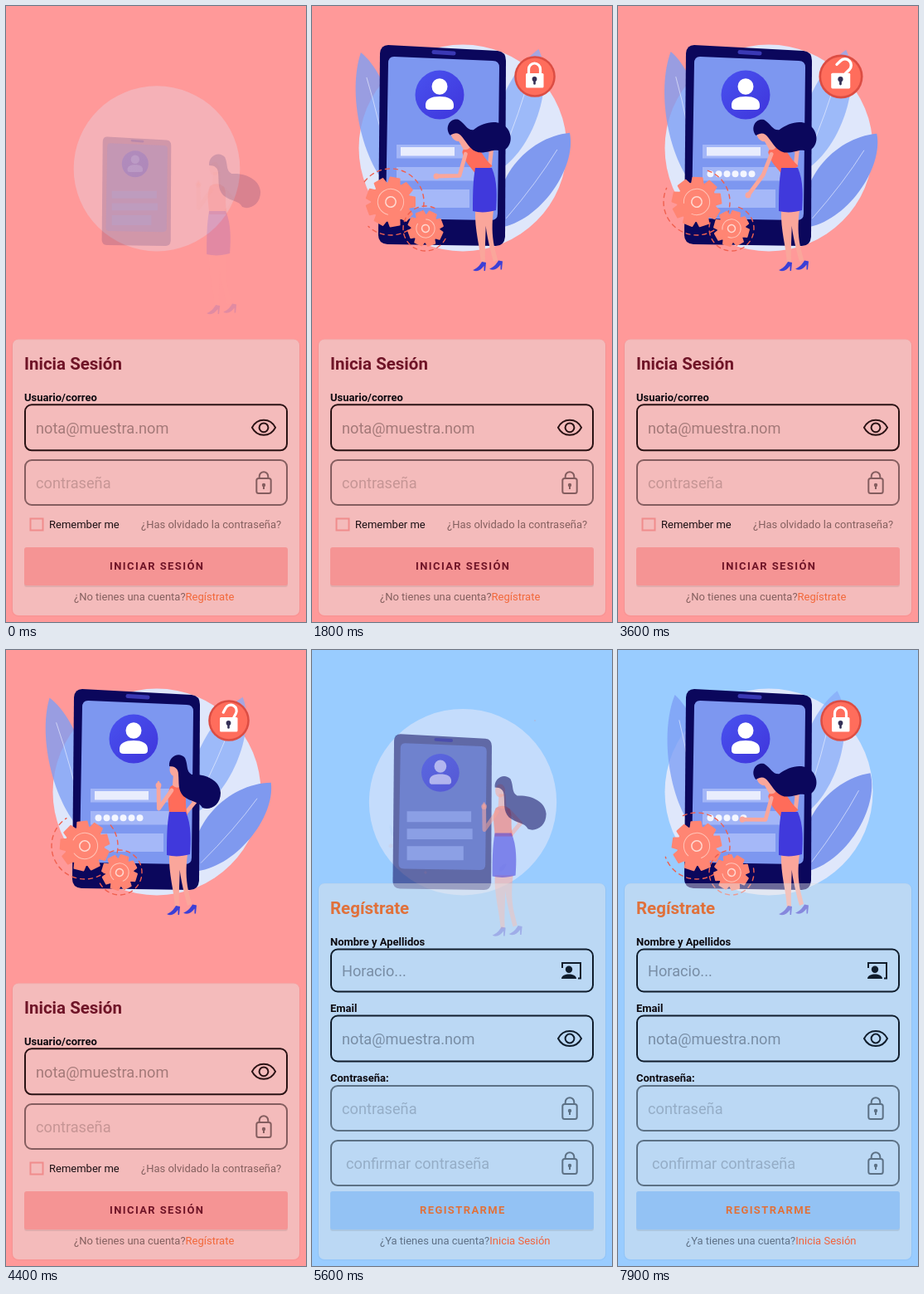
Recreate the animation shown at these times as an HTML page with a canvas. Size 362 px wide and 742 px high, loop 8000 ms.

```html
<!DOCTYPE html>
<html lang="es">
<head>
<meta charset="utf-8">
<title>Acceso</title>
<style>
html, body { margin: 0; width: 100%; height: 100%; overflow: hidden; }
body { position: relative; font-family: Roboto, "Noto Sans", sans-serif; }
.page { position: absolute; left: 0; top: 0; width: 362px; height: 742px; overflow: hidden; }
.page canvas, .page svg { position: absolute; left: 0; top: 0; width: 362px; height: 742px; }
#login { background: #ff9999; --accent: #6f1427; --muted: #85605f; --btn: #f59494; --link: #f2683a; --ink: #2a1214; }
#signup { background: #99ccff; --accent: #e0713b; --muted: #5f7187; --btn: #93c2f4; --link: #f2623c; --ink: #101d2c; }
.title { font-size: 20.5px; font-weight: 700; fill: var(--accent); }
.label { font-size: 13px; font-weight: 700; fill: #0d0a10; }
.hint { font-size: 18.2px; fill: var(--muted); opacity: .72; }
.dim .hint { opacity: .75; }
.small { font-size: 13px; fill: var(--muted); }
.dark { fill: #1c1014; }
.link { fill: var(--link); }
.action { font-size: 13px; font-weight: 700; letter-spacing: 1.4px; fill: var(--accent); }
.box, .icon { fill: none; stroke: var(--ink); stroke-width: 2; }
.solid { fill: var(--ink); stroke: none; }
.dim { opacity: .55; }
</style>
</head>
<body>
<div class="page" id="login"></div>
<div class="page" id="signup"></div>
<script>
const W = 362, H = 742, LOOP = 8000;

// ---------- forms ----------
const label = (cls, x, y, s) => `<text class="${cls}" x="${x}" y="${y}">${s}</text>`;
const icons = {
  eye: '<path d="M-14 0C-8-12 8-12 14 0C8 12-8 12-14 0Z"/><circle r="5.4"/>',
  lock: '<rect x="-8.700" y="-5" width="17.400" height="18" rx="2.500"/><path d="M-5.300-5V-7.500a5.300 5.300 0 0 1 10.600 0V-5M0 4V8"/><circle class="solid" cy="3" r="2.200"/>',
  person: '<path d="M-9-3V-9H13V9.500H10"/><circle class="solid" cx="-1" cy="-1.200" r="4.200"/><path class="solid" d="M-10 10c0-4 5-5.500 9-5.500s9 1.500 9 5.500z"/>'
};
const field = (y, h, hint, icon, dim, x = 36) => `<g class="${dim ? 'dim' : ''}">
  <rect class="box" x="23" y="${y + 1}" width="316" height="${h - 2}" rx="8"/>
  ${label('hint', x, y + h / 2 + 7, hint)}
  <g class="icon" transform="translate(311 ${y + h / 2})">${icons[icon]}</g></g>`;
const card = y => `<rect x="7.500" y="${y + .5}" width="347" height="${734.5 - y}" rx="7" fill="none" stroke="#000" stroke-opacity=".04"/>
  <rect x="8" y="${y}" width="346" height="${734 - y}" rx="7" fill="#e6e6e6" fill-opacity=".44"/>`;
const button = (x, s) => `<rect x="22" y="654" width="318" height="46" rx="3" fill="#000" opacity=".08"/>
  <rect x="22" y="652" width="318" height="46" rx="3" fill="var(--btn)"/>${label('action', x, 679, s)}`;
const footer = (ask, link) => label('small', 82, 716, `${ask}<tspan class="link">${link}</tspan>`);
const MAIL = 'nota@muestra.nom';

const forms = {
  login: card(401.5) + label('title', 22, 437.8, 'Inicia Sesión') +
    label('label', 22, 475.8, 'Usuario/correo') +
    field(479.3, 57, MAIL, 'eye') + field(546, 56, 'contraseña', 'lock', true) +
    '<rect x="29.500" y="617.500" width="15" height="14" fill="none" stroke="#f08c8c" stroke-width="2"/>' +
    label('small dark', 52, 629.3, 'Remember me') +
    label('small', 163, 629.3, '¿Has olvidado la contraseña?') +
    button(125, 'INICIAR SESIÓN') + footer('¿No tienes una cuenta?', 'Regístrate'),
  signup: card(281) + label('title', 22, 318, 'Regístrate') +
    label('label', 22, 356, 'Nombre y Apellidos') + field(359.5, 53, 'Horacio...', 'person') +
    label('label', 22, 436, 'Email') + field(439.5, 57, MAIL, 'eye') +
    label('label', 22, 520, 'Contraseña:') + field(524, 56, 'contraseña', 'lock', true) +
    field(590, 56, 'confirmar contraseña', 'lock', true, 41) +
    button(130, 'REGISTRARME') + footer('¿Ya tienes una cuenta?', 'Inicia Sesión')
};

const dpr = window.devicePixelRatio || 1;
function makePage(id) {
  const el = document.getElementById(id);
  el.innerHTML = `<canvas width="${W * dpr}" height="${H * dpr}"></canvas><svg viewBox="0 0 ${W} ${H}">${forms[id]}</svg>`;
  return { el, ctx: el.firstChild.getContext('2d') };
}
const login = makePage('login'), signup = makePage('signup');

// ---------- illustration ----------
const clamp = x => Math.max(0, Math.min(1, x));
const ramp = (t, a, b) => clamp((t - a) / (b - a));
const ease = (t, a, b) => { const u = ramp(t, a, b); return u * u * (3 - 2 * u); };
const rad = d => d * Math.PI / 180;
const NAVY = '#0b075c', SKIN = '#faa69b', CORAL = '#ff6c5a', BLUE = '#4039dc';

const shapes = {
  body: 'M92 47L224 54Q234 55 234 66L233 278Q232 289 222 289L91 287Q80 286 80 276L82 57Q83 47 92 47Z',
  screen: 'M99 61L218 66Q226 66 226 74L224 250Q224 258 216 258L97 256Q89 256 89 248L92 69Q92 61 99 61Z',
  bust: 'M137 121C136 112 144 109 154 109C164 109 172 112 171 121Q171 125 166 125H142Q137 125 137 121Z',
  torso: 'M198 165C202 161 211 161 215 166C219 175 215 185 219 199L197 199C197 188 193 176 198 165Z',
  neck: 'M202 148H210L211 164Q206 168 201 163Z',
  hair: 'M197 140C196 128 209 122 216 130C220 139 217 146 224 150C240 149 258 156 259 172C259 187 246 194 237 190C233 182 224 184 214 176C207 168 209 160 208 150C208 143 204 140 197 140Z',
  skirt: 'M197 195H217C224 211 223 230 222 246C212 249 202 249 194 247C194 230 194 211 197 195Z',
  legs: 'M197 246H209C211 268 208 285 209 309L204 311C203 290 196 270 197 246ZM208 246H219C217 262 217 275 220 290L224 306L219 308C214 290 209 270 208 246Z',
  shoe: 'M194 318C198 317 203 312 205 308L210 309L209 319L207.500 319L207.500 313C204 318 199 321 194 318Z'
};
for (const k in shapes) shapes[k] = new Path2D(shapes[k]);

// hand position over time: [ms, x, y]
const handKeys = [[1150, 184, 163], [1950, 150, 203], [2720, 150, 203], [2900, 153, 221], [3300, 157, 226], [3850, 157, 228], [4500, 184, 163]];
function handAt(t) {
  let i = 0;
  while (i < handKeys.length - 2 && t > handKeys[i + 1][0]) i++;
  const a = handKeys[i], b = handKeys[i + 1], u = ease(t, a[0], b[0]);
  const tap = t > 1950 && t < 2720 ? 2 * Math.sin((t - 1950) / 110 * Math.PI) : 0;
  return [a[1] + (b[1] - a[1]) * u, a[2] + (b[2] - a[2]) * u + tap];
}

function drawScene(c, t) {
  c.setTransform(dpr, 0, 0, dpr, 0, 0);
  c.clearRect(0, 0, W, H);
  if (t <= 0) return;
  c.lineCap = c.lineJoin = 'round';

  const fill = (p, col) => { c.fillStyle = col; c.fill(p); };
  const rect = (x, y, w, h, col, r = 0) => { c.beginPath(); c.roundRect(x, y, w, h, r); c.fillStyle = col; c.fill(); };
  const oval = (x, y, rx, ry, col) => { c.beginPath(); c.ellipse(x, y, rx, ry, 0, 0, 7); c.fillStyle = col; c.fill(); };
  const line = (pts, w, col) => {
    c.beginPath();
    pts.forEach(p => c.lineTo(p[0], p[1]));
    c.lineWidth = w; c.strokeStyle = col; c.stroke();
  };
  const ring = (x, y, r, w, col, a = 0, b = 7) => { c.beginPath(); c.arc(x, y, r, a, b); c.lineWidth = w; c.strokeStyle = col; c.stroke(); };
  const group = (x, y, scale, rot, alpha, draw) => {
    if (alpha <= 0 || scale <= 0) return;
    c.save();
    c.globalAlpha *= alpha;
    c.translate(x, y); c.rotate(rot); c.scale(scale, scale); c.translate(-x, -y);
    draw();
    c.restore();
  };

  const k = ease(t, 0, 700), pop = ease(t, 300, 850);
  const sway = lag => t < 950 + lag ? 0 : (1 - Math.cos((t - 950 - lag) / 1900 * Math.PI)) / 2;

  group(182, 295, .75 + .25 * k, 0, ramp(t, 0, 650), () => oval(182, 171, 125.5, 124.5, '#dfe7fb'));

  // wide leaf blade: upper and lower half widths differ
  const leaf = (x, y, tx, ty, upper, lower, turn, col) =>
    group(x, y, pop, rad(turn), pop, () => {
      c.translate(x, y); c.rotate(Math.atan2(ty - y, tx - x));
      const l = Math.hypot(tx - x, ty - y);
      c.beginPath(); c.moveTo(0, 0);
      c.bezierCurveTo(l * .25, -upper * 1.1, l * .75, -upper, l, 0);
      c.bezierCurveTo(l * .8, lower, l * .25, lower * 1.1, 0, 0);
      c.fillStyle = col; c.fill();
      c.beginPath(); c.moveTo(l * .1, 0); c.quadraticCurveTo(l * .5, 4, l * .82, 0);
      c.lineWidth = .8; c.strokeStyle = 'rgba(235,240,255,.75)'; c.stroke();
    });
  leaf(98, 225, 51, 58, 27, 28, 6.5 * sway(200), 'rgba(125,158,245,.78)');
  leaf(222, 200, 286, 57, 28, 32, -8.5 * sway(0), 'rgba(135,170,248,.74)');
  leaf(226, 267, 320, 160, 39, 32, -8 * sway(0), '#7f99ef');

  group(158, 289, .43 + .57 * k, 0, ramp(t, 120, 640), () => {
    fill(shapes.body, NAVY);
    line([[147, 55.5], [171, 57]], 5, '#3a38b4');
    fill(shapes.screen, '#7d97f0');
    const g = c.createLinearGradient(130, 80, 180, 135);
    g.addColorStop(0, '#4850ee'); g.addColorStop(1, '#3f36dc');
    oval(154, 107, 29.5, 29.5, g);
    oval(154, 97, 9.5, 9.8, '#fff');
    fill(shapes.bust, '#fff');
    rect(102, 167, 100, 16.5, '#a3b6f7');
    rect(107, 170, 65 * ramp(t, 600, 1240), 10.5, '#e9edfd');
    rect(102, 194, 102, 16.5, '#a3b6f7');
    for (let i = 0; i < 6; i++) {
      const r = 4 * ramp(t, 2160 + 110 * i, 2230 + 110 * i);
      if (r) oval(111.5 + 10 * i, 202.3, r, r, '#f4f6ff');
    }
    rect(102, 221, 88, 22, '#a5b8f8');
  });

  const gear = (x, y, r, teeth, rot, orbit) => group(x, y, pop, rad(rot), pop, () => {
    c.beginPath();
    for (let i = 0; i < teeth; i++) {
      const a = i / teeth * 2 * Math.PI, s = Math.PI / teeth;
      [[-.85, .78], [-.55, 1], [.55, 1], [.85, .78]].forEach(([d, m]) =>
        c.lineTo(x + Math.cos(a + d * s) * r * m, y + Math.sin(a + d * s) * r * m));
    }
    c.closePath();
    c.fillStyle = c.strokeStyle = '#ff8573'; c.lineWidth = 2;
    c.fill(); c.stroke();
    ring(x, y, r * .53, 1, '#ffc4b8', .4, 5.6);
    ring(x, y, r * .21, 1.6, '#ffd8d0');
    c.setLineDash([5, 5]);
    ring(x, y, orbit, 1.4, '#f0604f', 2.4, 7.2);
    c.setLineDash([]);
  });
  gear(95, 236, 29.5, 9, t * .04, 40);
  gear(137, 268, 21, 8, -t * .055, 27);

  // padlock badge
  const kick = Math.sin(Math.PI * ramp(t, 3400, 4200));
  const shackle = 28 * ease(t, 3350, 3700) + 18 * kick;
  group(269, 85, ease(t, 350, 800) * (1 + .07 * kick), 0, ramp(t, 350, 700), () => {
    oval(269, 85, 24.8, 24.8, '#dc4d43');
    oval(269, 85, 22.3, 22.3, '#ff6d5c');
    group(275.5, 80, 1, rad(shackle), 1, () => {
      c.beginPath(); c.moveTo(261.5, 82); c.lineTo(261.5, 76);
      c.arc(268.5, 76, 7, Math.PI, 0); c.lineTo(275.5, 82);
      c.lineWidth = 3.2; c.strokeStyle = '#fff'; c.stroke();
    });
    rect(258, 81, 21.5, 17.5, '#fff', 1.5);
    oval(268.5, 88, 2.9, 2.9, '#343057');
    line([[268.5, 89], [268.5, 93.5]], 2.6, '#343057');
  });

  // woman
  const lean = ease(t, 1250, 2050) * (1 - ease(t, 3900, 4500));
  const tilt = rad(-34 * lean);
  c.save();
  c.globalAlpha = ramp(t, 120, 640);
  c.translate(60 * (1 - k), 65 * (1 - k));
  fill(shapes.legs, SKIN);
  fill(shapes.shoe, '#3b3fd6');
  c.save(); c.translate(20, -1.5); fill(shapes.shoe, '#3b3fd6'); c.restore();
  group(208, 198, 1, tilt, 1, () => {
    line([[214, 168], [228, 183], [217, 196]], 5, SKIN);
    fill(shapes.torso, CORAL);
    fill(shapes.neck, SKIN);
    oval(203.5, 144, 6, 8, SKIN);
    fill(shapes.hair, NAVY);
  });
  fill(shapes.skirt, BLUE);

  // front arm: two links from shoulder to hand
  const cs = Math.cos(tilt), sn = Math.sin(tilt);
  const sx = 208 - 8 * cs + 29 * sn, sy = 198 - 8 * sn - 29 * cs;
  const [hx, hy] = handAt(t);
  const up = 27, fore = 28;
  const dist = Math.min(Math.hypot(hx - sx, hy - sy), up + fore - .5);
  const dir = Math.atan2(hy - sy, hx - sx);
  const bend = Math.acos((up * up + dist * dist - fore * fore) / (2 * up * dist));
  const ex = sx + up * Math.cos(dir - bend), ey = sy + up * Math.sin(dir - bend);
  line([[sx, sy], [ex, ey], [hx, hy]], 4.8, SKIN);
  oval(hx, hy, 3.4, 3.6, SKIN);
  line([[hx, hy], [hx - 2 * lean, hy - 4 + 5 * lean]], 2.5, SKIN);
  c.restore();
}

// ---------- timeline ----------
const start = performance.now();
function tick() {
  const t = Math.floor((performance.now() - start) % LOOP / 100) * 100;
  const slide = H * Math.pow(1 - ramp(t, 4700, 5100), 1.94);
  signup.el.style.transform = `translateY(${Math.round(slide)}px)`;
  if (slide > 0) drawScene(login.ctx, Math.min(t, 4500) + 200);
  drawScene(signup.ctx, t - 5200);
  requestAnimationFrame(tick);
}
tick();
</script>
</body>
</html>
```
